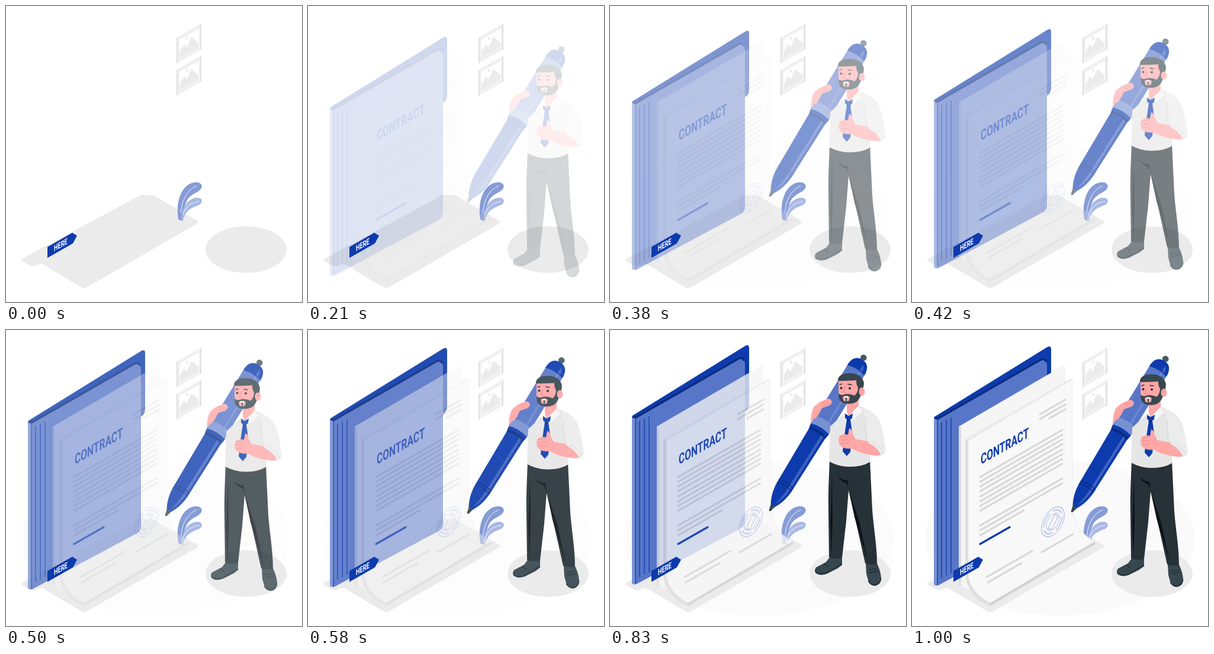
An HTML page that plays this animation: 500 by 500 pixels, repeating every 1040 ms.

```html
<!DOCTYPE html>
<html lang="en">
<head>
<meta charset="utf-8">
<title>Contract</title>
<style>
html, body { margin: 0; width: 100%; height: 100%; overflow: hidden; background: #fff; }
svg { display: block; width: 100%; height: 100%; }
text { font-family: Roboto, sans-serif; font-weight: 600; }
</style>
</head>
<body>
<svg viewBox="0 0 500 500" fill="none">
  <defs>
    <g id="picture">
      <path fill="#f0f0f0" d="M288 53.500L330 29.500V73L288 97Z"/>
      <path fill="#e0e0e0" d="M288 53.500L290 54.500V96L288 97ZM328 32L330 30V73L328 74Z"/>
      <path fill="#fff" d="M293 57L326 38V70L293 89Z"/>
      <path fill="#ebebeb" d="M293.500 88V77L301 64L305 70L313 52L325 62V70Z"/>
      <ellipse cx="306" cy="54.500" rx="2" ry="2.500" fill="#ebebeb"/>
    </g>
  </defs>

  <ellipse class="fade" cx="250" cy="352" rx="228" ry="131" fill="#fafafa"/>
  <path fill="#ebebeb" d="M27 427L226 320Q232 317 238 321Q243 317 249 320L322 362Q327 365 322 368L137 475Q132 477.500 127 475L65 438Q60 434 54 437Q46 442 40 438L28 431Q24 429 27 427Z"/>
  <ellipse cx="405.500" cy="411.500" rx="68.500" ry="39.500" fill="#ebebeb"/>
  <use href="#picture"/>
  <use href="#picture" y="54.500"/>

  <!-- plant -->
  <path fill="#869cd6" d="M291.500 361C286 336 294 302 318 298C328 296 334 303 329 309C324 316 312 317 306 328C300 340 299 352 298 363Z"/>
  <path fill="#a9b9e4" d="M296 361C297 340 307 326 321 324C332 323 334 331 326 336C314 341 303 344 299 363Z"/>
  <path stroke="#fff" stroke-width=".9" stroke-linecap="round" d="M295.500 349C297 328 306 310 322 304M299 352C303 339 312 332 326 330"/>

  <g class="rise">
    <path fill="#0d3bad" d="M37 149Q37 147 39 146L229 28.500Q235 25.500 235 33V126Q235 136 228 140L60 240Z"/>
    <path fill="#5876c8" d="M37 148L43 151L217 52Q228 47 228 60V325Q228 333 221 337L45 431Q37 433 37 428Z"/>
    <path fill="#7791d4" d="M37 148L43 151V431Q37 432 37 428Z"/>
    <path stroke="#0a2c80" stroke-width="3.500" d="M38 148L43 150L216 51Q224 47 227 54"/>
    <path stroke="#0d3bad" stroke-width="1.300" d="M43 152V431M50 156V419M58 152V415M66 148V411"/>
  </g>

  <g class="fade">
    <path fill="#f5f5f5" d="M79 163L256 60Q259 59 259 63V345L100 440L79 432Z"/>
    <path fill="#dedede" d="M79 163L83 165V434L79 432Z"/>
    <path fill="#d2d2d2" d="M132 460L309 356V362L132 466Z"/>
    <path fill="#dedede" d="M90 184L96 187V410C96 432 112 452 132 460V466C108 458 90 435 90 410Z"/>
    <path fill="#ebebeb" d="M90 184L268 82L271 84L95 187Z"/>
    <path fill="#f8f8f8" stroke="#e6e6e6" stroke-width=".8" d="M95 187L268 85Q271 83 271 87V300C272 325 290 350 309 357L132 461C112 452 95 432 95 410Z"/>
    <g id="lines" stroke="#d9d9d9" stroke-width="3.200"></g>
    <path stroke="#0d3bad" stroke-width="3.200" stroke-linecap="round" d="M115 361.500L165 333"/>
    <text transform="matrix(.65 -.37 0 1 116 227.500)" font-size="24" fill="#0d3bad">CONTRACT</text>
    <g transform="matrix(.866 -.5 0 1 238 324)" stroke="#c3cdec">
      <circle r="22.500" stroke-width="1.800"/>
      <circle r="18" stroke-width="2.500" stroke-dasharray="22 6"/>
      <circle r="13" stroke-width="1.500"/>
      <path stroke-width="2" d="M-9 7L3 -11L10 -4L-2 12Z"/>
    </g>
  </g>

  <path fill="#0d3bad" d="M70 407L112 383L120 388L113 401L70 425.500Z"/>
  <text transform="matrix(.66 -.37 0 1 81 414.500)" font-size="14" fill="#fff">HERE</text>

  <g class="rise">
    <!-- far arm -->
    <path fill="#ffa6a6" d="M340 178C338 152 340 138 346 130L368 124L380 160L358 190Z"/>

    <!-- pen, drawn along its axis from the tip -->
    <g transform="translate(270 307) rotate(-58.500) scale(1 1.080)">
      <path fill="#37474f" d="M0 -1.500Q-2 0 0 1.500L13 4.500V-4.500Z"/>
      <path fill="#0d3bad" d="M10 -4C25 -12 40 -13.500 52 -13.500L155 -15V15L52 13.500C40 13.500 25 12 10 4Z"/>
      <path fill="#3f62c0" d="M14 2C28 5 40 6 52 6L156 7V11L52 10C40 10 26 8 14 2Z"/>
      <path stroke="#0a2c80" stroke-width="1.500" d="M47 -13.500Q52 0 47 13.500M52 -13.500Q57 0 52 13.500"/>
      <path fill="#5876c8" d="M170 -15.500H284V15.500H170Z"/>
      <path fill="#6c88d0" d="M174 5H280V8H174Z"/>
      <path fill="#0a2c80" d="M152 -15Q157 0 152 15L164 16.500Q169 0 164 -16.500Z"/>
      <path fill="#0d3bad" d="M156 -16Q161 0 156 16L164 16.500Q169 0 164 -16.500Z"/>
      <path fill="#7791d4" d="M162 -16.500Q167 0 162 16.500L177 16Q182 0 177 -16Z"/>
      <circle cx="303" r="5" fill="#455a64"/>
      <path fill="#0d3bad" d="M278 -15.500H281C293 -15 299 -9 299 0S293 15 281 15.500H278Q283 0 278 -15.500Z"/>
      <path fill="#3f62c0" d="M282 5H292Q289 10 281 10Z"/>
    </g>
    <path fill="#ffa6a6" d="M341 146C342 133 349 127 356 123L368 118Q374 118 375 124Q373 130 366 131L358 134L353 144L347 152Z"/>
    <path stroke="#ee8585" stroke-width=".8" d="M358 125L367 122M360 129L370 126"/>

    <!-- shoes and trousers -->
    <path fill="#37474f" d="M371 386L365 394L348 403Q344 409 348 413Q355 418 366 414L384 405L392 399V386ZM432 396L433 414L437 428Q441 435 449 434Q458 431 458 422Q458 411 451 396Z"/>
    <path stroke="#1c262b" stroke-width="1.200" d="M347 411Q354 416 366 412L392 397M436 426Q441 434 449 432Q457 430 458 421M362 397L369 402M437 407L451 405M438 412L453 409"/>
    <path fill="#263238" d="M371 220C370 250 368 280 369 310L370 386Q380 390 392 387L399 325L403 273L414 320L431 396Q441 400 451 397C451 365 445 335 443 305L439 220Z"/>
    <path fill="#0c1317" d="M384 248Q392 256 401 256L404 274Q401 262 398 260Q390 258 384 248ZM404 274L421 325L435 391L413 318ZM375 246L372 330L374 384L376 320Z"/>

    <!-- shirt, neck and tie -->
    <path fill="#e6e6e6" d="M400 140L391 147L372 165L370 224Q386 233 405 233Q426 233 439 225L440 150L429 133L419 130Z"/>
    <path fill="#ffa6a6" d="M400 122L420 115V133L404 148L400 141Z"/>
    <path fill="#f5f5f5" d="M420 130L426 139L411 153L403 147ZM400 140L403 147L398 151L396 144Z"/>
    <path fill="#0d3bad" d="M397 143L403 147L410 143L409 151L406 153L409 175L406 208L400 215L393 207L396 180L400 153L397 150Z"/>
    <path fill="#0a2c80" d="M401 153L405 154L404 157L401 156Z"/>

    <!-- near arm -->
    <path fill="#ffa6a6" d="M404 168Q409 169 410 178L414 186L446 192L464 208Q461 215 448 214Q425 212 408 202Q394 204 388 196Q384 188 388 181Q394 176 402 179Z"/>
    <path stroke="#ee8585" stroke-width=".9" d="M402 179Q396 183 389 182M390 187Q396 189 402 186M390 193Q397 195 404 192M410 179L413 186"/>
    <path fill="#ececec" d="M428 133C449 140 457 153 461 176L466 204Q466 213 458 214Q453 201 437 193Q433 165 430 150Z"/>
    <path stroke="#d4d4d4" stroke-width=".9" d="M437 193Q453 201 458 214M433 190Q430 165 432 150M442 191Q456 198 463 211"/>

    <!-- head -->
    <path fill="#ffa6a6" d="M386 86L420 85V112L410 124H394L386 114Z"/>
    <path fill="#37474f" d="M385 88C384 78 396 74 406 75C420 75 428 83 429 92L427 106L421 118C416 126 407 128 397 126C388 124 386 118 386 109Q390 114 399 110Q407 110 413 113Q419 108 419 99Q416 95 416 87Q400 88 385 88Z"/>
    <ellipse cx="425.500" cy="106" rx="5" ry="7" fill="#ffa6a6"/>
    <path stroke="#ee8585" d="M423 107Q424 102 428 103"/>
    <path fill="#ffa6a6" d="M393 115Q399 111 405 115L404 121Q399 124 394 121Z"/>
    <path fill="#fff" d="M396 114H402L401 117H397Z"/>
    <path stroke="#37474f" stroke-width="2" d="M399 116V122"/>
    <path stroke="#ee8585" stroke-width="1.200" stroke-linecap="round" d="M397 98L394 107L398 108"/>
    <path stroke="#263238" stroke-width="1.400" stroke-linecap="round" d="M388 94L392 93M402 93.500L408 94.500"/>
    <circle cx="390.500" cy="100" r="2" fill="#263238"/>
    <circle cx="405" cy="100.500" r="2" fill="#263238"/>
  </g>
</svg>
<script>
const LOOP = 1040, STEP = 1000 / 24, SLOPE = -0.573;

// Text rules on the page: [left x, left y, right x]
const rules = [
  [215, 143, 260], [215, 151, 260], [231, 150, 260],
  ...[249, 257, 265, 273, 282, 290, 298, 306, 331, 339].map(y => [114, y, 255]),
  [114, 347.5, 190], [125, 418, 204], [127, 427, 186], [218, 376, 273]
];
document.getElementById('lines').innerHTML = rules.map(([x, y, end]) =>
  `<path d="M${x} ${y}L${end} ${y + (end - x) * SLOPE}"/>`).join('');

const bezier = (a, b, s) => 3 * (1 - s) ** 2 * s * a + 3 * (1 - s) * s * s * b + s ** 3;

// Same meaning as the CSS cubic-bezier()
const easing = (x1, y1, x2, y2) => x => {
  let low = 0, high = 1;
  for (let i = 0; i < 24; i++) {
    const mid = (low + high) / 2;
    if (bezier(x1, x2, mid) < x) low = mid; else high = mid;
  }
  return bezier(y1, y2, low);
};
const overshoot = easing(0.36, -0.01, 0.5, 1.38);
const easeIn = easing(0.42, 0, 1, 1);

const rising = document.querySelectorAll('.rise');
const fading = document.querySelectorAll('.fade');

function draw(now) {
  const step = Math.floor((now % LOOP + 5) / STEP);
  const x = step < 3 ? 0 : Math.min(1, (step + 0.5) * STEP / 1000);
  const p = overshoot(x);
  for (const el of rising) {
    el.setAttribute('opacity', Math.max(0, Math.min(1, p)));
    el.setAttribute('transform', `translate(0 ${30 * (1 - p)})`);
  }
  for (const el of fading) el.setAttribute('opacity', easeIn(x));
}

const start = performance.now();
function tick() {
  draw(performance.now() - start);
  requestAnimationFrame(tick);
}
tick();
</script>
</body>
</html>
```
